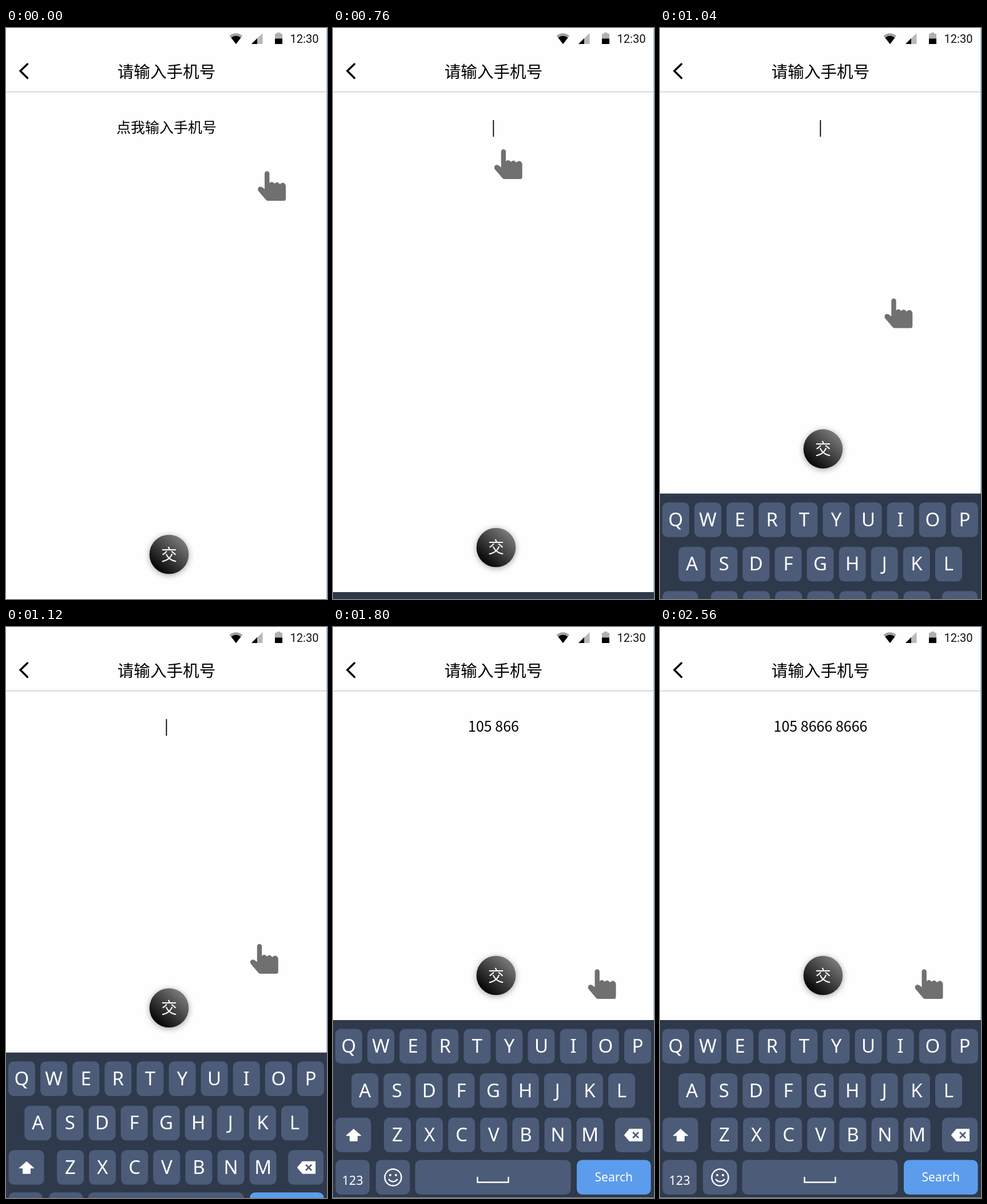
An HTML page that plays this animation: 561 by 998 pixels, repeating every 2640 ms.

```html
<!DOCTYPE html>
<html lang="zh-CN">
<head>
<meta charset="utf-8">
<style>
  html, body { margin: 0; width: 100%; height: 100%; overflow: hidden; background: #fefefe; }
  svg { display: block; width: 561px; height: 998px; }
  text { text-anchor: middle; font-family: "Noto Sans CJK SC", "Noto Sans CJK", sans-serif; }
  .key { fill: #4c5b78; }
  .label { fill: #fff; font-family: "Noto Sans", "Open Sans", sans-serif; }
  .line { fill: none; stroke: #fff; stroke-width: 2.4; }
</style>
</head>
<body>
<svg viewBox="0 0 561 998">
  <defs>
    <linearGradient id="shade" x1="0.15" y1="0.85" x2="0.8" y2="0.1">
      <stop offset="0" stop-color="#050505"/>
      <stop offset="1" stop-color="#7a7a7a"/>
    </linearGradient>
    <filter id="blur" x="-50%" y="-50%" width="200%" height="200%">
      <feGaussianBlur stdDeviation="6"/>
    </filter>
  </defs>

  <!-- Status bar -->
  <path fill="#a0a0a0" d="M390.500 13.500Q402 5 413 13.500L402 28Z"/>
  <path d="M393.500 17Q402 10.500 410.500 17L402 28Z"/>
  <path fill="#b8b8b8" d="M429 28H448.500V9Z"/>
  <path d="M429 28H439V18Z"/>
  <path fill="#b0b0b0" d="M470 10H473.500V8H479.500V10H483V19H470Z"/>
  <path d="M470 18.500H483V28H470Z"/>
  <text x="521.500" y="26" font-size="20" fill="#111" style="font-family:Roboto,sans-serif">12:30</text>

  <!-- Header -->
  <path d="M37.500 63L25 75L37.500 87.500" fill="none" stroke="#000" stroke-width="3.400" stroke-linecap="round"/>
  <text x="280.500" y="86.500" font-size="28.600" font-weight="500">请输入手机号</text>
  <rect y="111" width="561" height="1.200" fill="#c4c4c4"/>
  <rect x="560" width="1" height="998" fill="#8cbcf4"/>

  <text id="field" x="280.500" y="183" font-size="25"></text>
  <rect id="caret" x="279.500" y="161" width="1.800" height="29"/>

  <g id="panel">
    <circle cx="285" cy="611" r="34" filter="url(#blur)" opacity=".38"/>
    <circle cx="285" cy="609" r="34.300" fill="url(#shade)"/>
    <text x="285" y="619.500" font-size="28" font-weight="500" fill="#fff">交</text>
    <rect y="687" width="561" height="310.500" fill="#2e394b"/>
    <g id="keys"></g>
    <path fill="#fff" stroke="#fff" stroke-linejoin="round" d="M36 877.500L49 889H42.500V898.500H29.500V889H23Z"/>
    <path fill="#fff" stroke="#fff" stroke-width="2" stroke-linejoin="round" d="M510 888L518.500 878H540V898H518.500Z"/>
    <path stroke="#4c5b78" stroke-width="2.600" d="M524 883L534 893M534 883L524 893"/>
    <circle class="line" cx="105" cy="962" r="14.500"/>
    <circle cx="100" cy="958" r="2" fill="#fff"/>
    <circle cx="110" cy="958" r="2" fill="#fff"/>
    <path class="line" d="M97 965Q105 974 113 965"/>
    <path class="line" d="M252.500 961V970.500H306.500V961"/>
  </g>

  <path id="hand" fill="#707070" d="M12 4.400a4.200 4.200 0 0 1 8.400 0V21Q25 16.500 29.300 22Q34 17 38.500 23Q46 17 49 25.500V48.500Q49 52 45.500 52H17.500Q15.500 52 14 50L1.200 35Q-1 31 1.500 28.500Q4.500 26 8 28.500L12 31.500Z"/>
</svg>
<script>
const $ = id => document.getElementById(id);
const LOOP = 2640, STEP = 40;
const PLACEHOLDER = '点我输入手机号', DIGITS = '10586668666';

let markup = '';
function key(x, y, width, label = '', size = 33, baseline = 41.5, fill = '#4c5b78') {
  markup += `<rect class="key" x="${x}" y="${y}" width="${width}" height="60.500" rx="9.500" style="fill:${fill}"/>
    <text class="label" x="${x + width / 2}" y="${y + baseline}" font-size="${size}">${label}</text>`;
}
[['QWERTYUIOP', 4, 702.5], ['ASDFGHJKL', 32.2, 780], ['ZXCVBNM', 89, 857.5]].forEach(([letters, x, y]) =>
  [...letters].forEach((letter, i) => key(x + i * 56.1, y, 47, letter)));
key(4.5, 857.5, 62);
key(493, 857.5, 62);
key(4.5, 931.5, 59.5, '123', 21.5, 43);
key(75, 931.5, 59.5);
key(143.5, 931.5, 272);
key(426, 931.5, 129.5, 'Search', 21, 37, '#5c9cec');
$('keys').innerHTML = markup;

// Cubic Bezier easing whose control points lie at heights 0 and 1
function ease(t, start, end, a, b) {
  const x = Math.min(1, Math.max(0, (t - start) / (end - start)));
  let lo = 0, hi = 1;
  for (let i = 0; i < 24; i++) {
    const s = (lo + hi) / 2, r = 1 - s;
    if (3 * r * r * s * a + 3 * r * s * s * b + s ** 3 < x) lo = s; else hi = s;
  }
  return lo * lo * (3 - 2 * lo);
}

function formatNumber(count) {
  return [[0, 3], [3, 7], [7, 11]]
    .map(([from, to]) => DIGITS.slice(from, Math.min(to, count)))
    .filter(Boolean).join(' ');
}

function draw(now) {
  const t = Math.floor((now % LOOP) / STEP) * STEP;
  const tap = ease(t, 0, 600, 0.42, 0.58);
  const leave = ease(t, 640, 1200, 0.4, 0.8);
  const rise = ease(t, 680, 1200, 0.43, 0.905);
  const x = 440 - 173.5 * tap + 179 * leave;
  const y = 250 - 74 * tap + 422 * leave;
  $('hand').setAttribute('transform', `translate(${x} ${y})`);
  $('panel').setAttribute('transform', `translate(0 ${311 * (1 - rise)})`);

  const typed = Math.max(0, Math.floor((t - 1200) / 120) + 1);
  const focused = t >= 640;
  $('field').textContent = focused ? formatNumber(typed) : PLACEHOLDER;
  $('field').setAttribute('font-weight', focused ? 500 : 400);
  $('caret').style.display = focused && !typed ? '' : 'none';
}

let origin;
function tick(now) {
  origin ??= now;
  draw(now - origin);
  requestAnimationFrame(tick);
}
draw(0);
requestAnimationFrame(tick);
</script>
</body>
</html>
```
